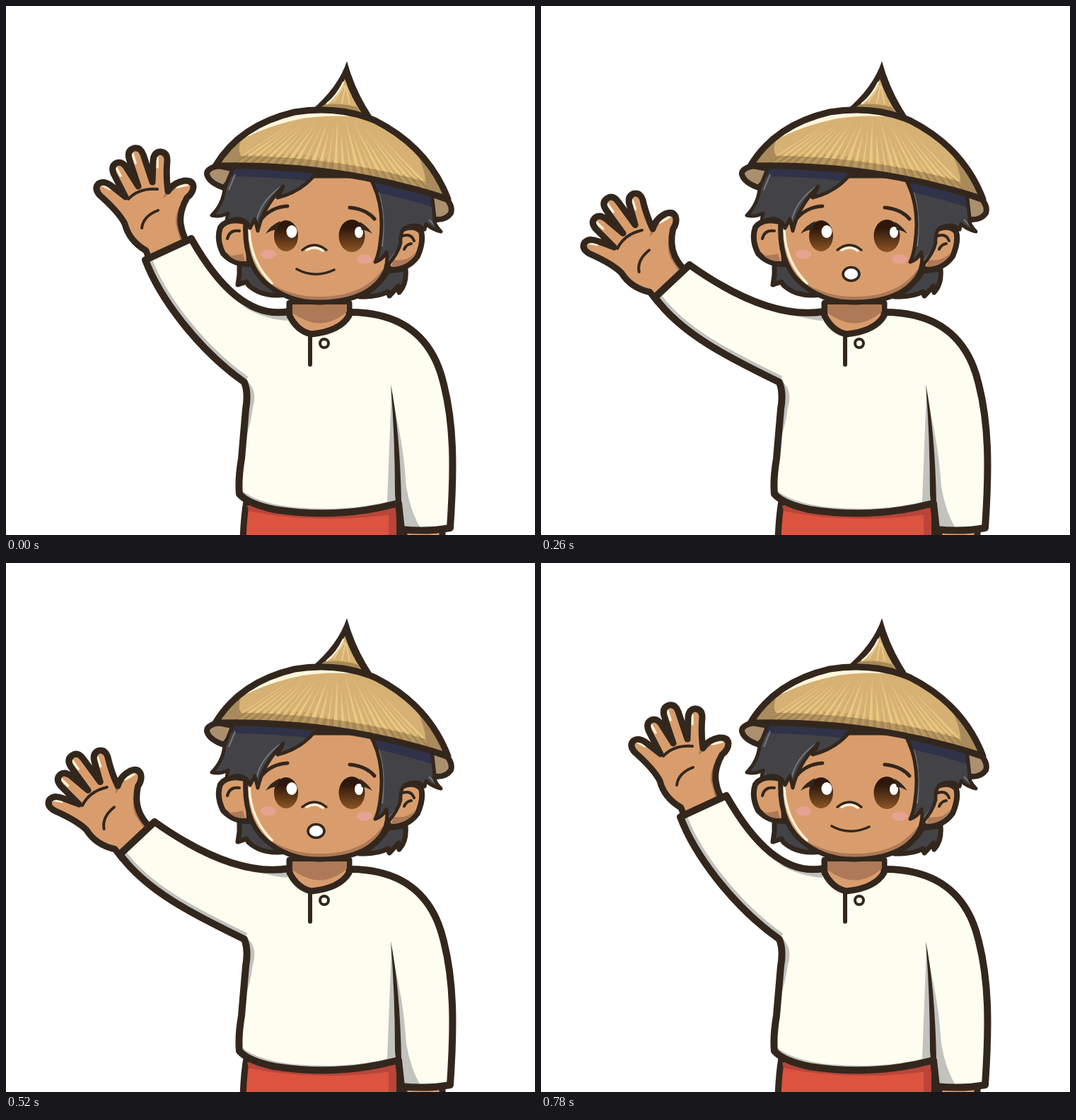
An HTML page for the animation above (910 ms loop, 748 by 748 pixels).

```html
<!DOCTYPE html>
<html lang="en">
<head>
<meta charset="utf-8">
<title>Waving boy</title>
<style>
  html, body { margin: 0; width: 100%; height: 100%; overflow: hidden; background: #fff; }
  svg { display: block; width: 100%; height: 100%; }
  .ink { stroke: #33271d; stroke-width: 9; stroke-linejoin: round; stroke-linecap: round; }
  .thin { stroke-width: 4; }
  .line { fill: none; }
  .skin { fill: #d99d6d; }
  .shade { fill: #ae7957; }
  .hair { fill: #434347; }
  .cloth { fill: #fdfdf0; }
  .grey { fill: #c2c2bf; }
  .cream { fill: none; stroke: #fff3d8; stroke-width: 3.5; stroke-linecap: round; }
  .solid { fill: #33271d; }
</style>
</head>
<body>
<svg viewBox="0 0 748 748">
  <defs>
    <linearGradient id="iris" x2="0" y2="1">
      <stop offset=".25" stop-color="#2d180b"/><stop offset="1" stop-color="#8d5525"/>
    </linearGradient>
    <path id="shirt"/>
    <path id="palm" d="M204 362L198 346Q174 332 168 308Q160 292 133 268Q124 258 131 251Q139 246 150 255L169 270
      L152 237Q148 226 156 222Q164 219 170 228L187 255L174 216Q171 204 181 201Q190 199 194 210L207 249
      L208 218Q209 207 218 206Q228 207 228 218Q226 240 229 262Q236 250 252 247Q264 246 265 255
      Q265 264 256 271Q245 290 247 308Q249 322 256 334"/>
    <path id="face" d="M339 305Q335 370 375 398Q405 420 445 419Q500 418 525 392Q537 380 541 360V240H340Z"/>
    <path id="locks" d="M322 226L309 258Q307 280 291 296Q302 299 314 293Q312 301 312 306Q328 295 341 306
      L345 314L352 301L356 318Q364 283 392 255Q388 265 384 271Q420 262 440 234Z
      M513 240Q537 280 529 335Q527 352 522 362Q532 359 538 348Q540 360 537 369Q554 352 558 335
      Q557 322 563 314Q575 308 585 311L592 316L594 308Q602 316 615 319Q603 306 606 299L602 264Z"/>
    <path id="dome" d="M296 226Q331 168 408 150Q470 140 522 162Q597 200 625 273Q470 222 296 226Z"/>
    <clipPath id="inShirt"><use href="#shirt"/></clipPath>
    <clipPath id="inPalm"><use href="#palm"/></clipPath>
    <clipPath id="inFace"><use href="#face"/></clipPath>
    <clipPath id="inLocks"><use href="#locks"/></clipPath>
    <clipPath id="inDome"><use href="#dome"/></clipPath>
  </defs>

  <!-- trousers and lowered hand -->
  <path class="ink" fill="#dc533f" d="M340 700Q336 724 335 756H556V700Z"/>
  <path fill="#b9453a" d="M341 706Q440 732 552 708V718Q440 734 343 714ZM541 712H552V748H541Z"/>
  <path class="ink skin" d="M563 737V756H617V738Z"/>

  <!-- raised hand -->
  <g id="hand">
    <use href="#palm" class="skin"/>
    <g clip-path="url(#inPalm)">
      <path class="shade" d="M262 262Q238 286 240 308L247 334H260V265ZM168 305Q182 332 200 341L204 350L190 350L162 310ZM229 252L222 272L240 258Z"/>
      <path class="cream" d="M136 253L147 259M156 229L162 240M179 209L183 222M214 215V228M242 256L256 253"/>
    </g>
    <use href="#palm" class="ink line"/>
    <path class="ink line thin" d="M173 273Q188 257 214 259M192 314Q194 297 215 289"/>
  </g>

  <!-- shirt -->
  <use href="#shirt" class="cloth"/>
  <g clip-path="url(#inShirt)">
    <path id="armShade" fill="none" stroke="#c2c2bf" stroke-width="19"/>
    <path class="grey" d="M338 528Q357 542 349 568Q346 592 338 614ZM330 682Q350 701 400 708Q480 716 539 701L545 545L556 600V730H330Z
      M551 580Q562 620 566 680Q572 716 588 742H556ZM335 425Q365 434 398 428V445Q365 443 335 425ZM488 430Q514 438 532 443L540 432Z"/>
  </g>
  <use href="#shirt" class="ink line" style="stroke-width:10"/>
  <path class="solid" d="M544 535Q557 600 559 700L563 742H555L550 690Q550 610 544 535Z"/>

  <!-- lower hair and ears -->
  <path class="ink hair" style="stroke-width:7" d="M330 362V380L328 394L340 390L343 395Q360 410 385 409L400 408L345 362Z
    M540 375Q525 400 500 411Q525 412 540 404L542 410L555 396L556 405Q567 393 565 372Z"/>
  <path class="ink skin" style="stroke-width:8" d="M342 306Q314 298 303 313Q297 330 307 350Q322 366 344 365Z
    M555 318Q576 307 587 319Q591 333 582 354Q566 376 538 371Z"/>
  <path class="shade" d="M314 352Q324 362 338 361L335 350Q322 354 314 352ZM580 348Q568 369 545 369L548 359Q568 362 580 348Z"/>
  <path class="ink line thin" d="M313 329Q316 316 330 318M561 325Q573 321 577 332M563 344Q566 337 573 336"/>

  <!-- neck and collar -->
  <path class="ink skin" d="M401 420V438Q412 460 432 464Q472 460 485 438V420Z"/>
  <path class="shade" d="M405 422H482V432Q446 464 405 434Z"/>
  <path class="ink line" style="stroke-width:6" d="M430 463V507"/>
  <circle class="ink cloth thin" cx="450" cy="477" r="6"/>

  <!-- face -->
  <use href="#face" class="skin"/>
  <g clip-path="url(#inFace)">
    <path class="shade" d="M370 390Q405 412 445 411Q505 410 532 373L550 380L500 430H390ZM430 232H520V246Q475 234 430 238Z"/>
    <path class="cream" d="M344 318Q346 362 376 392"/>
  </g>
  <use href="#face" class="ink line" style="stroke-width:7"/>
  <g fill="#e6a393"><ellipse cx="371" cy="351" rx="11" ry="6.5"/><ellipse cx="507" cy="358" rx="11" ry="6.5"/></g>
  <g fill="url(#iris)"><ellipse cx="396" cy="325" rx="17" ry="22"/><ellipse cx="489" cy="325" rx="18.5" ry="23"/></g>
  <g fill="#fff"><ellipse cx="404" cy="319" rx="7.5" ry="9"/><ellipse cx="499" cy="320" rx="6" ry="8"/></g>
  <path class="solid" d="M388 304Q374 310 367 322Q377 316 383 317ZM500 305Q511 311 518 322Q508 316 503 317Z"/>
  <path class="ink line" style="stroke-width:5" d="M361 301Q376 284 398 283M486 285Q509 287 521 301"/>
  <path class="cream" d="M425 345Q437 338 448 346"/>
  <path class="ink line" style="stroke-width:3.5" d="M419 345Q436 331 453 345"/>
  <path id="mouth" class="ink" style="stroke-width:3.6"/>

  <!-- hat underside, fringe, hat -->
  <path class="ink" fill="#ab9070" style="stroke-width:8" d="M300 226Q283 230 284 238Q287 250 308 257L330 232ZM595 264L624 274Q632 284 629 293Q622 303 607 302L596 290Z"/>
  <use href="#locks" class="hair"/>
  <g clip-path="url(#inLocks)" fill="none">
    <path stroke="#30324a" stroke-width="26" d="M303 228Q470 226 622 277"/>
    <path stroke="#76777f" stroke-width="2" d="M324 238L315 260M388 256Q360 276 354 305M527 264Q537 295 532 340M554 345L541 361M610 314L598 302"/>
  </g>
  <use href="#locks" class="ink line" style="stroke-width:5"/>

  <path class="solid" d="M482 78Q470 115 431 148L525 167Q495 126 482 78Z"/>
  <path fill="#d6b173" d="M479 103Q470 128 444 144Q475 143 504 153Q488 130 479 103Z"/>
  <path fill="#a88955" d="M451 139Q475 137 496 143L504 153Q475 143 444 144Z"/>
  <path stroke="#edcf92" stroke-width="1.6" d="M478 112L463 136M480 112L475 138M481 114L486 139"/>
  <path class="cream" style="stroke-width:2.5" d="M477 108Q468 127 454 138"/>
  <use href="#dome" fill="#d6b173"/>
  <g clip-path="url(#inDome)">
    <path id="straw" fill="#e9c983"/>
    <path fill="none" stroke="#6d5030" stroke-opacity=".4" stroke-width="28" d="M296 226Q470 222 625 273"/>
    <path id="weave" fill="none" stroke="#8f7040" stroke-opacity=".5" stroke-width="1.4"/>
    <path fill="#a98a5c" d="M290 226L332 190Q326 210 336 214L304 228ZM590 196L630 284L594 255Q594 230 572 190Z"/>
    <path fill="#fff6dc" d="M329 191Q370 158 415 152Q465 142 514 159Q465 152 420 159Q372 168 329 191Z"/>
  </g>
  <use href="#dome" class="ink line"/>
</svg>

<script>
const $ = id => document.getElementById(id);
const set = (id, attr, value) => $(id).setAttribute(attr, value);

// Straw fans out from a point under the spike to the rim.
let straw = '', weave = '';
for (let i = 0; i < 26; i++) {
  const x = 303 + i * 12.5, y = 232 + Math.max(0, x - 400) * .2;
  const start = .28 + .2 * Math.abs(Math.sin(i * 5.3));
  const sx = 470 + (x - 470) * start, sy = 122 + (y - 122) * start;
  const w = 1.8 + 2 * Math.abs(Math.sin(i * 2.1));
  straw += `M${sx} ${sy}L${x - w} ${y}H${x + w}Z`;
  weave += `M${x + 6} ${y}L${x + 6 - (x - 470) * .2} ${y - (y - 122) * .2}`;
}
set('straw', 'd', straw);
set('weave', 'd', weave);

// Arm poses: upper sleeve, lower sleeve, and where the hand sits.
const poses = [
  { top: 'C345 442 300 396 262 329', cuff: '197 359', low: 'C216 410 269 484 337 532', x: 196.5, y: 255, turn: 0 },
  { top: 'C345 442 285 402 237 345', cuff: '178 384', low: 'C217 457 271 498 337 532', x: 161.5, y: 281.5, turn: -8 },
  { top: 'C340 442 272 410 210 366', cuff: '161 412', low: 'C200 466 272 500 337 532', x: 125, y: 318.5, turn: -17.7 }
];
const body = 'Q343 547 339 570L333 640Q328 670 330 690Q342 704 380 712Q470 726 555 703L559 740' +
  'Q595 744 628 738C634 650 633 590 619 535C603 465 556 433 486 433Z';
const mouths = {
  smile: ['M411 372Q437 386 464 373', 'none'],
  open: ['M417 374Q440 375 462 372Q456 386 439 386Q422 385 417 374Z', '#fff'],
  round: ['M427 379a11.5 9.5 0 1 1 23 0a11.5 9.5 0 1 1 -23 0Z', '#fff']
};
const steps = [[0, 'smile'], [1, 'open'], [2, 'round'], [2, 'open'], [2, 'round'], [1, 'open'], [0, 'smile']];
const STEP = 130;

function draw(now) {
  const [arm, mouth] = steps[Math.floor(now / STEP) % steps.length];
  const p = poses[arm];
  set('shirt', 'd', `M400 432${p.top}L${p.cuff}${p.low}${body}`);
  set('armShade', 'd', `M${p.cuff}${p.low}`);
  set('hand', 'transform', `translate(${p.x} ${p.y}) rotate(${p.turn}) translate(-196.5 -255)`);
  set('mouth', 'd', mouths[mouth][0]);
  set('mouth', 'fill', mouths[mouth][1]);
  requestAnimationFrame(draw);
}
draw(performance.now());
</script>
</body>
</html>
```
